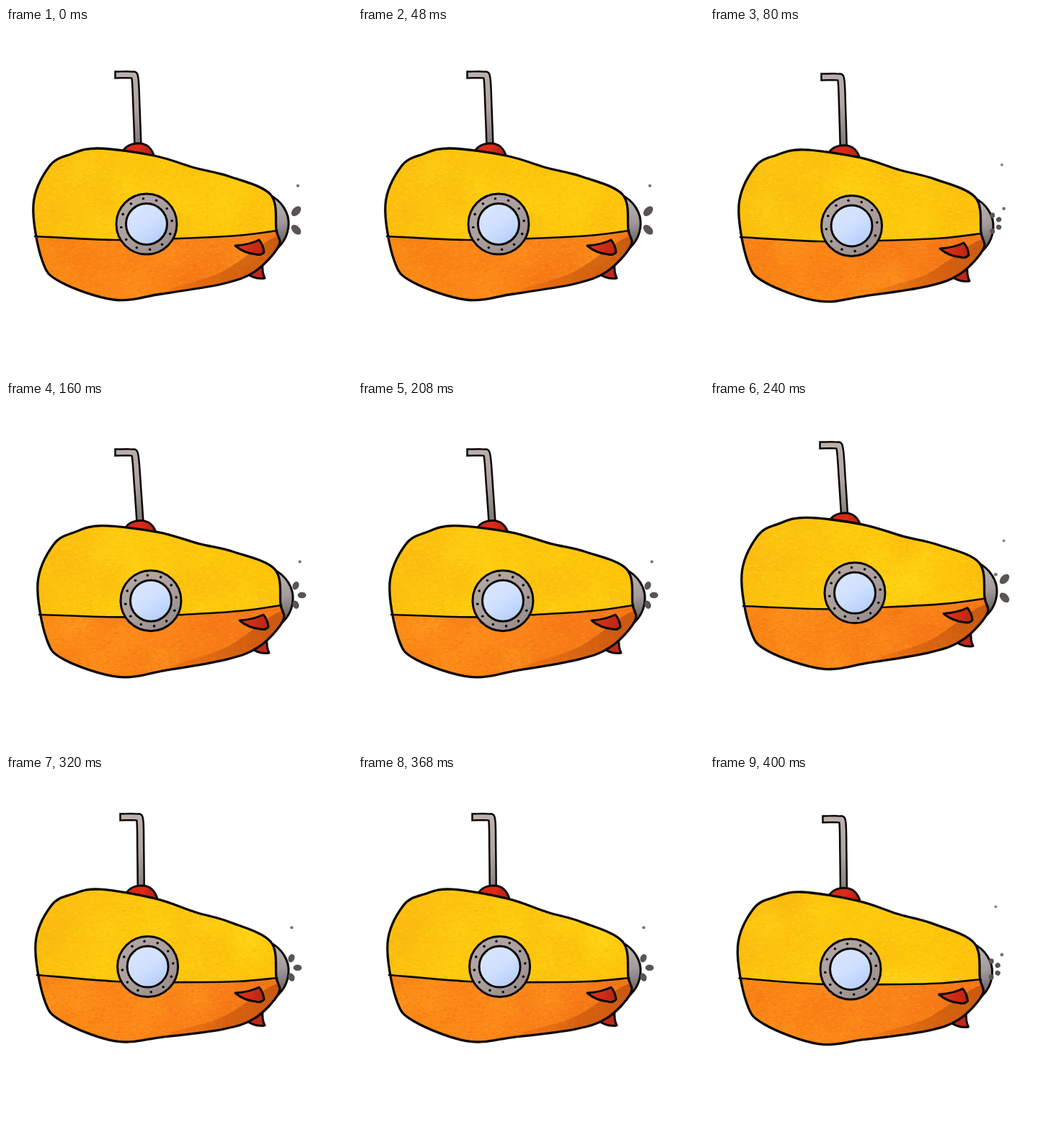
Recreate the animation shown at these times as an HTML page with a canvas. Size 480 by 480 pixels, loop 0.48 s.

```html
<!DOCTYPE html>
<html lang="en">
<head>
<meta charset="utf-8">
<title>Submarine</title>
<style>
html, body { margin: 0; width: 100%; height: 100%; overflow: hidden; background: #fff; }
canvas { display: block; width: 480px; height: 480px; }
</style>
</head>
<body>
<canvas id="stage" width="480" height="480"></canvas>
<script>
const ctx = document.getElementById('stage').getContext('2d');
const HOLD = 80, INK = '#0b0705';

// How far the tail, the nose and the periscope tip sway in each pose
const poses = [
  { tail: [0, 0], nose: [0, 0], tip: [0, 0] },
  { tail: [2, 1], nose: [1, 4], tip: [3, 3] },
  { tail: [6, 6], nose: [6, 1], tip: [0, 5] },
  { tail: [6, -6], nose: [6, -8.5], tip: [1, -5] },
  { tail: [3, -13], nose: [0, -1], tip: [7, -8] },
  { tail: [0.5, -8.5], nose: [-0.5, 1], tip: [5, -5] }
];

const hull = [
  [38, 245], [60, 192], [90, 175], [128, 167], [205, 177], [262, 194], [310, 206], [367, 231],
  [375, 280], [378, 303], [345, 338], [300, 355], [215, 369], [150, 377], [75, 352], [50, 322]
];
const seam = [[40, 289], [150, 294], [240, 292], [320, 288], [376, 281]];
const shade = [[225, 366], [300, 338], [374, 290], [392, 310], [330, 372]];

const mix = (a, b, t) => a + (b - a) * t;
const shift = (a, b, t) => [mix(a[0], b[0], t), mix(a[1], b[1], t)];

function random(seed) {
  return () => (seed = seed * 16807 % 2147483647) / 2147483647;
}

// Catmull-Rom curve through the points
function smooth(points, closed) {
  const path = new Path2D(), n = points.length;
  const at = i => closed ? points[(i + n) % n] : points[Math.max(0, Math.min(n - 1, i))];
  path.moveTo(...points[0]);
  for (let i = 0; i < (closed ? n : n - 1); i++) {
    const [a, b, c, d] = [at(i - 1), at(i), at(i + 1), at(i + 2)];
    path.bezierCurveTo(b[0] + (c[0] - a[0]) / 6, b[1] + (c[1] - a[1]) / 6,
      c[0] - (d[0] - b[0]) / 6, c[1] - (d[1] - b[1]) / 6, c[0], c[1]);
  }
  return path;
}

function stroke(path, width = 3, color = INK) {
  ctx.lineWidth = width;
  ctx.strokeStyle = color;
  ctx.stroke(path);
}

function paint(path, fill) {
  ctx.fillStyle = fill;
  ctx.fill(path);
  stroke(path);
}

function gradient(x0, y0, x1, y1, ...colors) {
  const g = ctx.createLinearGradient(x0, y0, x1, y1);
  colors.forEach((c, i) => g.addColorStop(i / (colors.length - 1), c));
  return g;
}

function disc(x, y, r) {
  const path = new Path2D();
  path.arc(x, y, r, 0, 7);
  return path;
}

function moved([x, y], shape) {
  ctx.save();
  ctx.translate(x, y);
  shape();
  ctx.restore();
}

// Soft patches, then short crayon marks, inside the current clip
function texture(rnd, y0, y1, light, dark) {
  const spot = () => [mix(38, 390, rnd()), mix(y0, y1, rnd())];
  for (let i = 0; i < 24; i++) {
    const [x, y] = spot(), color = i % 2 ? light : dark;
    const g = ctx.createRadialGradient(x, y, 0, x, y, 35);
    g.addColorStop(0, color + '40');
    g.addColorStop(1, color + '00');
    ctx.fillStyle = g;
    ctx.fillRect(x - 35, y - 35, 70, 70);
  }
  ctx.lineWidth = 1.3;
  for (let i = 0; i < 2200; i++) {
    const [x, y] = spot(), len = 1 + 3 * rnd();
    ctx.strokeStyle = (i % 2 ? light : dark) + '60';
    ctx.beginPath();
    ctx.moveTo(x, y);
    ctx.lineTo(x + len, y + len * (rnd() - 0.6));
    ctx.stroke();
  }
}

function periscope(base, tip) {
  const tube = smooth([[156, 65], [174, 65], [179, 70], [181, 110], [183, 164]].map(([x, y]) => {
    const [dx, dy] = shift(base, tip, (160 - y) / 95);
    return [x + dx, y + dy];
  }));
  ctx.lineCap = 'square';
  stroke(tube, 11.5);
  stroke(tube, 6.5, gradient(155, 65, 180, 160, '#bcb0ae', '#b0a5a3', '#857b7a'));
  ctx.lineCap = 'round';
  moved(base, () => paint(new Path2D('M160 177C163 164 174 160 184 160C195 160 203 167 206 180Z'),
    gradient(165, 165, 203, 176, '#d92618', '#dc2b19', '#b81f14')));
}

function body(bend, rnd) {
  const outline = smooth(hull.map(bend), true);
  const line = smooth(seam.map(bend));
  const lower = new Path2D(line);
  [[420, 300], [420, 400], [20, 400], [20, 290]].forEach(p => lower.lineTo(...p));

  ctx.save();
  ctx.clip(outline);
  ctx.fillStyle = gradient(60, 170, 350, 300, '#fcbf10', '#fdc90c', '#fdc40c');
  ctx.fillRect(0, 0, 480, 480);
  texture(rnd, 155, 300, '#ffdf1a', '#f8ac10');

  ctx.clip(lower);
  ctx.fillStyle = gradient(60, 290, 330, 370, '#fb8a15', '#fc8518', '#f57717');
  ctx.fillRect(0, 0, 480, 480);
  texture(rnd, 272, 382, '#ffa020', '#f06a12');
  ctx.fillStyle = gradient(225, 365, 370, 300, '#b84b0820', '#b84b0878', '#a8430a90');
  ctx.fill(smooth(shade.map(bend), true));
  ctx.restore();

  stroke(line, 2.6);
  stroke(outline, 3.3);
}

function porthole([x, y]) {
  paint(disc(x, y, 42), gradient(x - 30, y - 40, x + 30, y + 40, '#b3a6a4', '#aca09e', '#958a89'));
  ctx.fillStyle = INK;
  for (let i = 0; i < 12; i++) {
    const a = i * Math.PI / 6 - 1.7;
    ctx.fill(disc(x + 35.5 * Math.cos(a), y + 35.5 * Math.sin(a), 1.8));
  }
  paint(disc(x, y, 28.5), gradient(x - 15, y - 22, x + 15, y + 22, '#d8e4ff', '#cfe0ff', '#b9d0fa'));
}

// Propeller blades fan out around the hub: two long, three medium or four short
function propeller(index) {
  const count = 2 + Math.abs(3 - index) % 3;
  const fan = 0.1 + 0.35 * count, reach = 25 - 3.5 * count;
  for (let i = 0; i < count; i++) {
    const a = mix(-fan, fan, i / (count - 1));
    ctx.beginPath();
    ctx.ellipse(390 + reach * Math.cos(a), 267 + reach * Math.sin(a),
      12.5 - 2.2 * count, 7 - 0.9 * count, a, 0, 7);
    ctx.fillStyle = '#5a5454';
    ctx.fill();
  }
}

// Every other pose lets go of a bubble, which rises for three poses
function bubbles(index) {
  ctx.fillStyle = '#74727e';
  for (let age = 0; age < 3; age++) {
    const born = (index - age + 6) % 6, drift = 0.9 * poses[born].nose[1];
    if (born % 2) ctx.fill(disc(404 + drift, 247 + drift - 29 * age, 2.4 - 0.3 * age));
  }
}

function draw(index) {
  const { tail, nose, tip } = poses[index];
  const bend = ([x, y]) => {
    const [dx, dy] = shift(tail, nose, (x - 40) / 335);
    return [x + dx, y + dy];
  };
  const middle = shift(tail, nose, 0.43);

  ctx.fillStyle = '#fff';
  ctx.fillRect(0, 0, 480, 480);
  ctx.lineJoin = 'round';
  periscope(shift(middle, tip, 0.5), tip);
  moved(nose, () => {
    paint(new Path2D('M365 231C383 240 393 257 392 273C391 289 384 299 376 306Z'),
      gradient(372, 240, 390, 298, '#b9b1b0', '#a39b9b', '#686061'));
    paint(new Path2D('M330 338L356 325Q355 340 359 347Q346 350 330 338Z'), '#c3281a');
  });
  body(bend, random(91 + index * 577));
  moved(nose, () => {
    paint(new Path2D('M318 302C330 301 342 299 351 294Q357 301 358 311Q354 316 347 314C337 313 326 309 318 302Z'),
      gradient(318, 300, 358, 312, '#dc3b14', '#cf2c14', '#b92412'));
    propeller(index);
  });
  porthole(bend([195, 272]));
  bubbles(index);
}

let shown = -1;
function tick() {
  const index = Math.floor(performance.now() / HOLD) % poses.length;
  if (index !== shown) draw(shown = index);
  requestAnimationFrame(tick);
}
tick();
</script>
</body>
</html>
```
